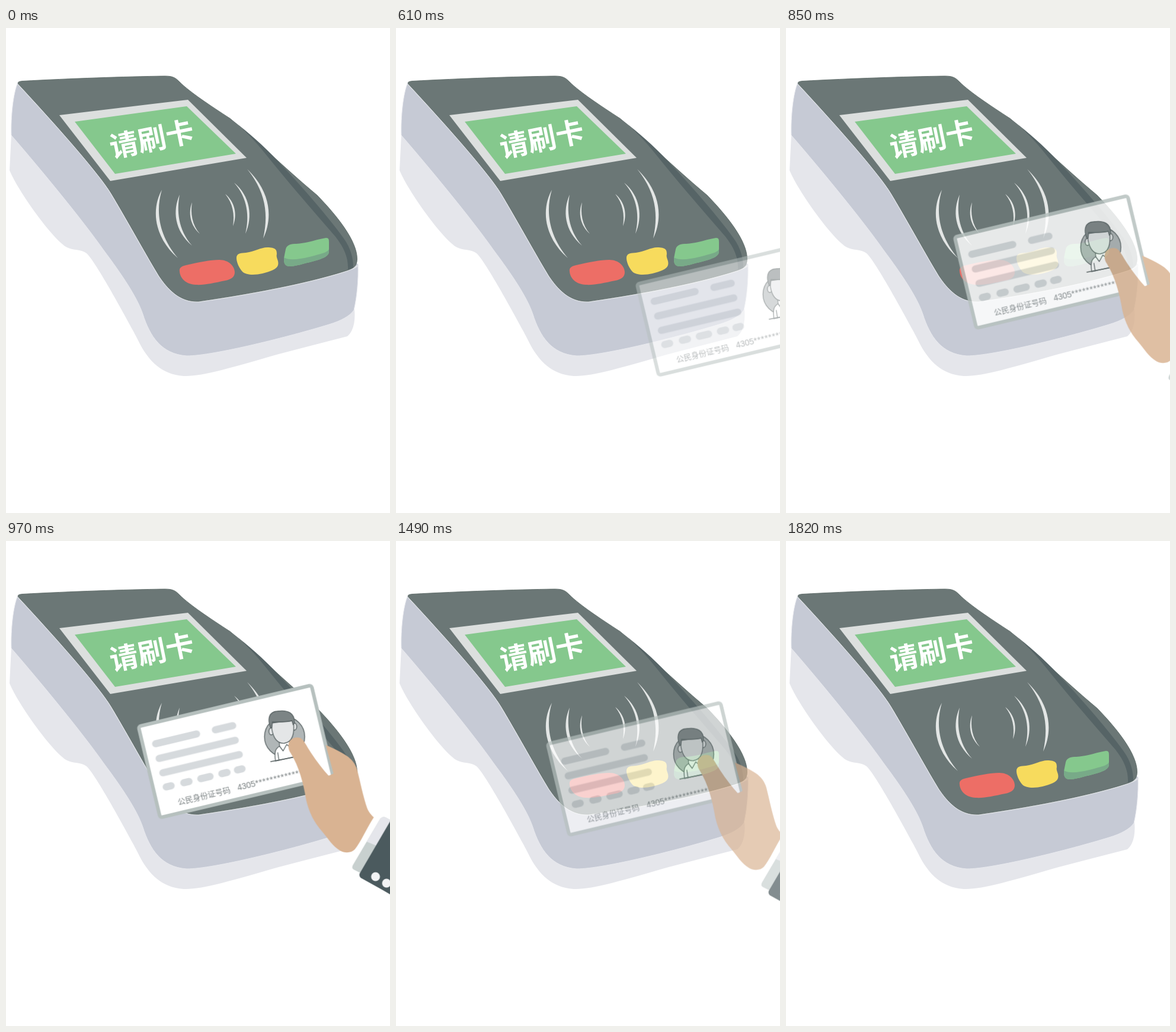
Recreate the animation shown at these times as an HTML page. Size 648x818 px, loop 1.99 s.

```html
<!DOCTYPE html>
<html lang="zh">
<head>
<meta charset="utf-8">
<title>请刷卡</title>
<style>
  html, body { margin: 0; width: 100%; height: 100%; overflow: hidden; background: #fff; }
  svg { display: block; width: 100vw; height: 100vh; }
  text { font-family: "Noto Sans CJK SC", "Noto Sans CJK", sans-serif; }

  /* 30 ms ticks: 25 sliding in, a pause, 16 sliding out */
  #swipe { animation: swipe 1990ms infinite; }
  @keyframes swipe {
    0%      { transform: translate(375.1px, 242.1px); opacity: 0; animation-timing-function: step-end; }
    11.005% { transform: translate(375.1px, 242.1px); opacity: 0; animation-timing-function: steps(25, end); }
    48.693% { transform: translate(-6.4px, -5.9px); opacity: 1; animation-timing-function: step-end; }
    67.286% { transform: translate(-6.4px, -5.9px); opacity: 1; animation-timing-function: steps(16, end); }
    91.407%, 100% { transform: translate(96.5px, 88px); opacity: 0; }
  }

  .bars { stroke: #d6dadd; stroke-width: 12; stroke-linecap: round; }
  .label { font-size: 13px; fill: #787f80; }
  .digits { font: 14px "Liberation Sans", Arial, sans-serif; }
  .stars { letter-spacing: .9px; }
  .line { stroke: #566061; stroke-width: 1.3; stroke-linejoin: round; stroke-linecap: round; }
</style>
</head>
<body>
<svg viewBox="0 0 648 818" preserveAspectRatio="none">
  <g id="terminal">
    <path fill="#e5e6eb" d="M9 181L6 240C20 275 80 358 103 370C115 376 125 372 136 380C150 392 205 492 222 525C237 556 258 584 300 587C330 588 380 573 460 550L576 520C586 512 590 495 588 474L300 400Z"/>
    <path fill="#c6cad5" stroke="#e9eaef" d="M20 92C12 110 8 150 9 181C60 240 130 325 165 375C195 415 222 455 231 483C243 520 262 550 305 553C350 553 480 520 545 500C565 494 580 486 587 476C592 455 595 425 594 398L300 300Z"/>
    <path fill="none" stroke="#dfe2e6" stroke-width="2.500" d="M594 400C592 403 587 405 575 409.500C500 433.500 400 450.500 325 461.500C295 462.500 275 443 258 418C235 380 205 325 178 280C160 250 100 180 20 94"/>
    <path fill="#6b7776" stroke="#55625f" stroke-width=".8" d="M20.500 94C19.500 91 22 90 28 89.500C110 85 200 82 268 81C282 81 286 84 293 91C310 108 345 131 378 152.500C420 187 470 236 525 282C560 318 593 360 592.500 390C592 402 587 405 575 409C500 433 400 450 325 461C295 462 275 443 258.500 418C235.500 380 205.500 325 178.500 280C160.500 250 100.500 180 20.500 94Z"/>
    <path fill="#566466" d="M374 150C400 168 425 190 450 215C495 262 545 320 570 355C582 372 586 388 586 404L577 408C578 390 572 372 556 352C520 310 480 265 440 215C420 190 400 168 374 150Z"/>

    <path fill="#dcdfde" d="M90 147L307 121L406 219L176 258Z"/>
    <path fill="#85c88d" d="M116 158L305 132L388 212L184 246Z"/>
    <text transform="translate(246 187) rotate(-11.5)" y="18" text-anchor="middle" font-size="48" font-weight="700" fill="#fff">请刷卡</text>

    <g fill="#e3e6e5">
      <path d="M263 273C245 305 249 352 290 388C258 350 252 310 263 273Z"/>
      <path d="M293 281C281 308 284 342 314 367C290 340 288 308 293 281Z"/>
      <path d="M314 294C307 312 311 333 327 347C314 332 311 312 314 294Z"/>
      <path d="M370 280C386 293 391 315 383 334C386 315 383 296 370 280Z"/>
      <path d="M385 261C412 283 417 318 404 347C411 318 408 287 385 261Z"/>
      <path d="M407 238C448 277 450 322 434 355C442 318 441 280 407 238Z"/>
    </g>

    <path fill="#ed6e66" d="M293 411C292 404 296 402 304 400C325 395 345 391 360 391C376 391 386 402 386 412C386 420 380 424 370 426C350 430 335 434 320 433C303 432 294 422 293 411Z"/>
    <path fill="#f7db5d" d="M389 386C391 379 397 380 405 379C420 377 430 370 441 370C455 370 457 374 457 381C455 388 461 392 459 400C457 407 445 411 433 414C420 417 405 417 399 411C394 406 388 394 389 386Z"/>
    <path fill="#85c88d" d="M472 373C474 365 482 364 490 364C510 363 525 356 540 354C545 354 545 357 545 362V378C544 385 535 389 520 393C500 398 490 402 478 402C469 401 469 395 469 388Z"/>
    <path fill="#78aa88" d="M469 387C480 394 505 388 520 384C535 380 543 378 545 373V378C544 385 535 389 520 393C500 398 490 402 478 402C469 401 469 395 469 387Z"/>
  </g>

  <g id="swipe">
    <g id="card" transform="translate(226.500 317.500) rotate(-13.4)">
      <rect x="3" y="2" width="300" height="158" rx="4" fill="#fff" stroke="#b6c0be" stroke-width="6"/>
      <path class="bars" d="M24.500 37H95.500M128 37.500H158M24.500 62.500H156.500M25 87.500H157.500M25 112H33.500M55.500 112H64.500M85 112H101M121.500 112H130.500M148.500 112H156.500"/>
      <text class="label" x="38" y="145.500">公民身份证号码</text>
      <text class="label digits" x="141.500" y="145.500">4305<tspan class="stars">*************</tspan></text>
    </g>

    <g id="portrait" class="line">
      <circle cx="476.500" cy="336" r="34" fill="#b0b6b7"/>
      <path fill="#fff" d="M461 377C459 361 461 356 468 352L467 340H484L486 350C492 352 496 358 497 369Z"/>
      <path fill="none" d="M453 378L495 370M468 352L474 360L480 349L487 355M465 363L467 376"/>
      <ellipse cx="454" cy="327" rx="4" ry="6" fill="#e4e6e7"/>
      <ellipse cx="493" cy="319" rx="4" ry="6" fill="#e4e6e7"/>
      <path fill="#e4e6e7" d="M454 313L491 308C494 330 490 345 476 347C461 348 455 333 454 313Z"/>
      <path fill="#7c8485" d="M453 321C447 306 450 294 464 293C483 290 494 297 493 313L491 316L489 309C478 312 467 311 456 311L455 321Z"/>
    </g>

    <path id="hand" fill="#d9b392" d="M483 352C482 342 492 335 503 338C509 341 513 351 521 363C531 378 541 391 551 402L559 398L546 350C560 356 572 362 581 368C590 374 596 382 599 392C604 411 609 437 616 457C619 464 623 468 627 472C614 492 605 514 595 526C589 532 579 533 570 528C558 521 550 508 540 496C526 480 518 464 513 443C508 413 501 387 487 364C484 360 483 356 483 352Z"/>

    <g id="sleeve">
      <path fill="#c8d0cf" d="M638 474Q642 470 647 472L665 482L607 567L593 560Q589 557 592 552Z"/>
      <path fill="#e5e6eb" d="M638 474Q642 470 647 472L665 482L632 520L615 513Z"/>
      <path fill="#4b5a5e" d="M603 567L655 478L720 500V640L641 594L605 574Q602 571 603 567Z"/>
      <circle cx="630" cy="572" r="7.500" fill="#f2f3f4"/>
      <circle cx="648.500" cy="583" r="7.500" fill="#f2f3f4"/>
    </g>
  </g>
</svg>
</body>
</html>
```
